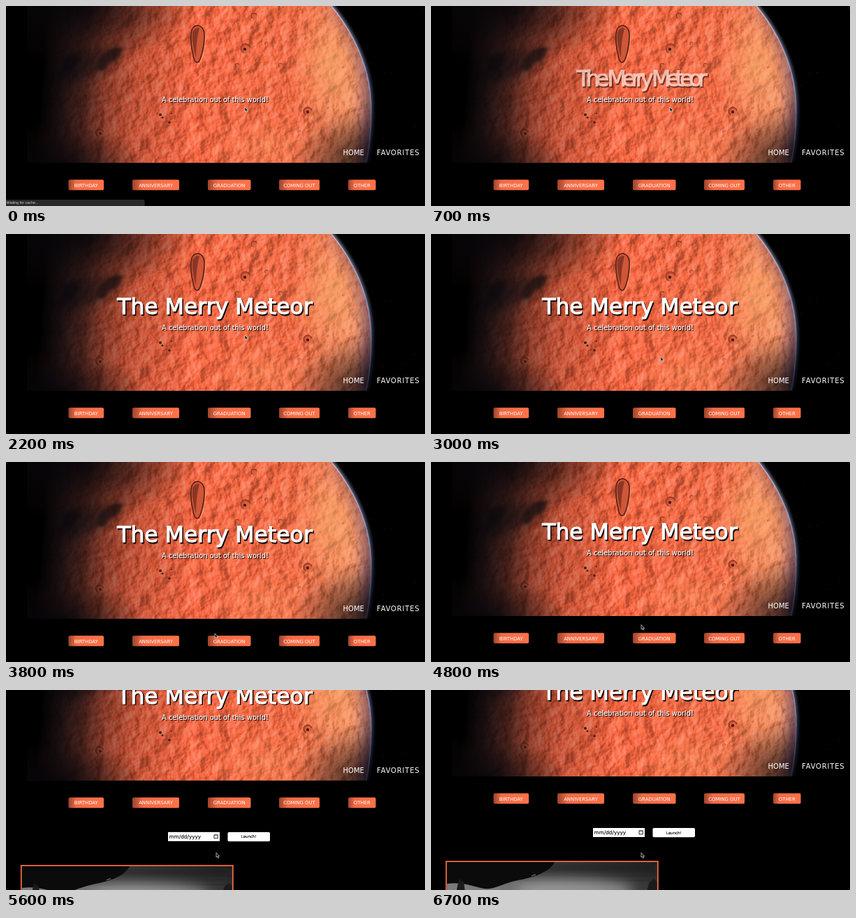
Animation of 600x287 px, one loop 6800 ms. Source, as an HTML page:

```html
<!DOCTYPE html>
<html lang="en">
<head>
<meta charset="utf-8">
<title>The Merry Meteor</title>
<style>
  html, body { margin: 0; width: 100%; height: 100%; overflow: hidden; background: #000; }
  svg { display: block; width: 100%; height: 100%; }
  text { font-family: "DejaVu Sans", sans-serif; fill: #fff; }
  .mid { text-anchor: middle; }
  .title { font-size: 31.5px; stroke: #fff; stroke-width: 1.1; }
  .tagline { font-size: 9.9px; stroke: #fff; stroke-width: .15; }
  .shade { fill: #0a0505; stroke: #0a0505; }
  .nav { font-size: 10px; }
  .label { font-size: 6.9px; }
  .form { fill: #111; stroke: #111; stroke-width: .15; }
  .status { font: 5.4px "Liberation Sans", sans-serif; fill: #d0d0d0; }
  .relief { mix-blend-mode: hard-light; }
</style>
</head>
<body>
<svg viewBox="0 0 600 287" preserveAspectRatio="none">
  <defs>
    <linearGradient id="surface" gradientUnits="userSpaceOnUse" x1="100" y1="0" x2="523" y2="0">
      <stop offset="0" stop-color="#e05a3c"/>
      <stop offset=".4" stop-color="#fa6640"/>
      <stop offset=".75" stop-color="#f66c44"/>
      <stop offset=".92" stop-color="#f28a5c"/>
      <stop offset="1" stop-color="#e89a80"/>
    </linearGradient>
    <linearGradient id="night" gradientUnits="userSpaceOnUse" x1="40" y1="40" x2="523" y2="75">
      <stop offset=".03" stop-color="#000"/>
      <stop offset=".09" stop-color="#07070b" stop-opacity=".92"/>
      <stop offset=".16" stop-color="#0c090c" stop-opacity=".72"/>
      <stop offset=".23" stop-color="#180d0c" stop-opacity=".4"/>
      <stop offset=".32" stop-color="#2a100a" stop-opacity=".18"/>
      <stop offset=".48" stop-color="#2a100a" stop-opacity="0"/>
    </linearGradient>
    <radialGradient id="dark">
      <stop offset="0" stop-color="#050408" stop-opacity=".9"/>
      <stop offset=".45" stop-color="#0c080b" stop-opacity=".55"/>
      <stop offset="1" stop-color="#1a0c0a" stop-opacity="0"/>
    </radialGradient>
    <linearGradient id="limbShade" gradientUnits="userSpaceOnUse" x1="0" y1="0" x2="0" y2="225">
      <stop offset="0" stop-color="#6a4a70" stop-opacity=".25"/>
      <stop offset=".4" stop-color="#4a2c48" stop-opacity=".5"/>
      <stop offset="1" stop-color="#140c1a"/>
    </linearGradient>
    <linearGradient id="rim" gradientUnits="userSpaceOnUse" x1="0" y1="0" x2="0" y2="225">
      <stop offset="0" stop-color="#c8c8ee"/>
      <stop offset=".5" stop-color="#98a8e0" stop-opacity=".8"/>
      <stop offset="1" stop-color="#40548c" stop-opacity=".35"/>
    </linearGradient>
    <radialGradient id="haze">
      <stop offset="0" stop-color="#ffb070" stop-opacity=".65"/>
      <stop offset="1" stop-color="#ff9a60" stop-opacity="0"/>
    </radialGradient>
    <linearGradient id="button">
      <stop offset="0" stop-color="#9c432c"/>
      <stop offset=".22" stop-color="#f16b45"/>
      <stop offset="1" stop-color="#ff7249"/>
    </linearGradient>
    <linearGradient id="photo" x1="0" y1="1" x2="1" y2="0">
      <stop offset="0" stop-color="#8c8c8c"/>
      <stop offset=".5" stop-color="#777"/>
      <stop offset="1" stop-color="#222"/>
    </linearGradient>
    <filter id="blur2" x="-50%" y="-50%" width="200%" height="200%"><feGaussianBlur stdDeviation="2"/></filter>
    <filter id="blur8" x="-50%" y="-50%" width="200%" height="200%"><feGaussianBlur stdDeviation="8"/></filter>
    <filter id="terrain" x="0" y="0" width="100%" height="100%" color-interpolation-filters="sRGB">
      <feTurbulence type="fractalNoise" baseFrequency=".045" numOctaves="4" seed="7"/>
      <feDiffuseLighting surfaceScale="5" lighting-color="#fff">
        <feDistantLight azimuth="20" elevation="30"/>
      </feDiffuseLighting>
    </filter>
    <path id="limb" d="M466 0C500 42 523 92 523 150C523 180 520 205 516 225"/>
    <clipPath id="planetClip"><path d="M30 0H466C500 42 523 92 523 150C523 180 520 205 516 225H30Z"/></clipPath>
    <clipPath id="heroClip"><path d="M0 0H600V225H0Z"/></clipPath>
    <clipPath id="photoClip"><path d="M23 348H324V520H23Z"/></clipPath>
  </defs>
  <rect width="600" height="287"/>

  <g id="page">
    <g clip-path="url(#heroClip)">
      <g id="stars" fill="#9aa4b8"></g>
      <use href="#limb" fill="none" stroke="url(#rim)" stroke-width="6" opacity=".6" filter="url(#blur2)"/>
      <g clip-path="url(#planetClip)">
        <rect width="600" height="225" fill="url(#surface)"/>
        <rect class="relief" width="600" height="225" filter="url(#terrain)" opacity=".32"/>
        <ellipse cx="465" cy="85" rx="60" ry="95" fill="url(#haze)"/>
        <ellipse cx="370" cy="200" rx="90" ry="45" fill="url(#haze)" opacity=".4"/>
        <g id="craters"></g>
        <path d="M84 66L130 64L166 58L160 76L128 98L96 112L70 106Z" fill="#15141a" opacity=".6" filter="url(#blur8)"/>
        <g filter="url(#blur2)" fill="#241718" opacity=".75">
          <path d="M134 74L150 61L168 59L163 73L148 82L140 94L128 90Z"/>
          <path d="M84 75L100 66L106 78L94 94L82 92Z"/>
        </g>
        <rect width="600" height="225" fill="url(#night)"/>
        <ellipse cx="105" cy="0" rx="165" ry="85" fill="url(#dark)"/>
        <ellipse cx="70" cy="232" rx="130" ry="65" fill="url(#dark)"/>
        <ellipse cx="530" cy="232" rx="125" ry="90" fill="url(#dark)"/>
        <use href="#limb" fill="none" stroke="url(#limbShade)" stroke-width="20" filter="url(#blur8)"/>
      </g>
      <use href="#limb" fill="none" stroke="url(#rim)" stroke-width="1.6" opacity=".8"/>
    </g>

    <g id="title">
      <text class="mid title shade" x="300.5" y="116.500">The Merry Meteor</text>
      <text class="mid title" x="299" y="115">The Merry Meteor</text>
    </g>
    <text class="mid tagline shade" x="300.5" y="139">A celebration out of this world!</text>
    <text class="mid tagline" x="299.5" y="138">A celebration out of this world!</text>
    <text class="nav" x="482.5" y="214">HOME</text>
    <text class="nav" x="531" y="214" letter-spacing=".8">FAVORITES</text>
    <g id="buttons"></g>

    <rect x="232" y="299" width="74" height="13" fill="#fff"/>
    <text class="form" x="233.5" y="308.3" font-size="7.3">mm/dd/yyyy</text>
    <path d="M298 303.2H303.3V308H298ZM299.3 302V303M302 302V303" fill="none" stroke="#111" stroke-width=".9"/>
    <rect x="317.5" y="299" width="60.5" height="13.3" rx="1.8" fill="#fff"/>
    <text class="mid form" x="347.7" y="307.6" font-size="5.5">Launch!</text>
    <g clip-path="url(#photoClip)">
      <rect x="23" y="348" width="301" height="172" fill="url(#photo)"/>
      <rect x="23" y="346" width="301" height="20" fill="#1c1c1c" opacity=".7" filter="url(#blur8)"/>
      <ellipse cx="205" cy="388" rx="85" ry="14" fill="#bbb" opacity=".6" filter="url(#blur8)"/>
      <path d="M23 348H177C170 362 148 370 124 374C102 379 90 388 76 386C60 383 46 376 23 379Z" fill="#0b0b0b"/>
      <path d="M36 392L40 372L47 377L49 392ZM308 392L313 377L319 372L324 376V392Z" fill="#1b1b1b"/>
      <path d="M144 368q3 -2 6 -2" stroke="#aaa" fill="none" stroke-width=".8"/>
    </g>
    <rect x="21.8" y="347" width="303" height="174" fill="none" stroke="#f26b48" stroke-width="1.8"/>
  </g>

  <g id="status">
    <path d="M0 278H196.500Q198.500 278 198.500 280V287H0Z" fill="#29292b"/>
    <text class="status" x=".5" y="284.300">Waiting for cache...</text>
  </g>
  <path id="cursor" d="M0 0V6.600L1.500 5.300L2.600 7.700L3.700 7.200L2.700 4.900H4.700Z" fill="#111" stroke="#fff" stroke-width=".6"/>
</svg>
<script>
const LOOP = 6800;
const byId = id => document.getElementById(id);
const page = byId("page"), title = byId("title"), status = byId("status"), cursor = byId("cursor");

let seed = 41;
const random = () => (seed = (seed * 16807) % 2147483647) / 2147483647;

function crater(x, y, r, strength = .7) {
  return `<g transform="translate(${x} ${y})" opacity="${strength}">
    <circle r="${r}" fill="#b9452c" stroke="#60251b" stroke-width="${Math.min(1, r / 4)}"/>
    <circle cx="${r * .15}" cy="${r * .15}" r="${r * .7}" fill="#e4633f"/>
    <path d="M${r} ${-r * .2}A${r} ${r} 0 0 1 ${-r * .4} ${r * .9}" fill="none" stroke="#ffa473" stroke-width=".8"/></g>`;
}

const pit = (x, y, r) => `<circle cx="${x}" cy="${y}" r="${r}" fill="#4a1c15"/>`;

let craters = "";
for (let i = 0; i < 110; i++) {
  craters += crater(110 + 385 * random(), 225 * random() ** 1.3, .5 + 1.8 * random() ** 3, .55);
}
craters += `<path d="M265 40Q266 28 275 28Q285 30 284 46Q282 70 276 80Q270 84 268 70Q264 55 265 40Z"
    fill="#cf5737" stroke="#54201a" stroke-width="1.6"/>
  <path d="M267 38Q271 29 277 32Q272 50 272 74Q266 55 267 38Z" fill="#8a3626"/>
  <path d="M286 40Q286 66 277 84" fill="none" stroke="#ff9a70"/>`;
craters += crater(343, 61, 7, .85) + pit(342, 62, 2.2);
craters += crater(432, 151, 6, .9) + pit(432, 152, 2.2);
craters += crater(134, 182, 5.5, .9) + pit(135, 183, 1.8);
craters += crater(355, 14, 4) + crater(331, 85, 3) + crater(393, 85, 3) + crater(373, 54, 2.5);
craters += pit(221, 156, 2) + pit(224, 160, 1.5) + pit(234, 167, 1.8) + pit(237, 154, 1);
byId("craters").innerHTML = craters;

let stars = "";
for (let i = 0; i < 22; i++) {
  stars += `<circle cx="${480 + 120 * random()}" cy="${210 * random()}" r=".45" opacity="${.15 + .35 * random()}"/>`;
}
byId("stars").innerHTML = stars;

byId("buttons").innerHTML = [
  ["BIRTHDAY", 89.5, 50.5], ["ANNIVERSARY", 181, 67], ["GRADUATION", 289, 61.5],
  ["COMING OUT", 391, 58], ["OTHER", 490, 39.5]
].map(([label, x, w]) =>
  `<rect x="${x}" y="249.300" width="${w}" height="15" rx="1.8" fill="url(#button)"/>
   <text class="mid label" x="${x + w / 2}" y="259.500">${label}</text>`).join("");

const progress = (t, start, duration) => Math.min(1, Math.max(0, (t - start) / duration));
const easeOut = p => 1 - (1 - p) ** 3;
const smooth = p => p * p * (3 - 2 * p);

// Pointer stops: departure, travel time, destination.
const moves = [[2650, 950, 299, 246], [3950, 550, 301, 233.5]];

function pointerAt(t) {
  let x = 342, y = 145;
  for (const [start, duration, toX, toY] of moves) {
    const p = smooth(progress(t, start, duration));
    x += (toX - x) * p;
    y += (toY - y) * p;
  }
  return `translate(${x} ${y})`;
}

// The title fades in while its tightly packed letters spread out.
function drawTitle(p) {
  const opacity = .6 * easeOut(Math.min(1, p / .4)) + .4 * easeOut(progress(p, .4, .6));
  title.setAttribute("opacity", opacity);
  title.setAttribute("letter-spacing", `${-15.75 * (1 - easeOut(p))}px`);
}

function draw(t) {
  const scroll = 101 * smooth(progress(t, 4670, 1090));
  drawTitle(progress(t, 300, 1500));
  page.setAttribute("transform", `translate(0 ${-scroll})`);
  cursor.setAttribute("transform", pointerAt(t));
  status.setAttribute("visibility", t < 400 ? "visible" : "hidden");
}

const begin = performance.now();
function tick() {
  const elapsed = (performance.now() - begin) % LOOP;
  draw(Math.floor(elapsed / 100) * 100);
  requestAnimationFrame(tick);
}
draw(0);
requestAnimationFrame(tick);
</script>
</body>
</html>
```
